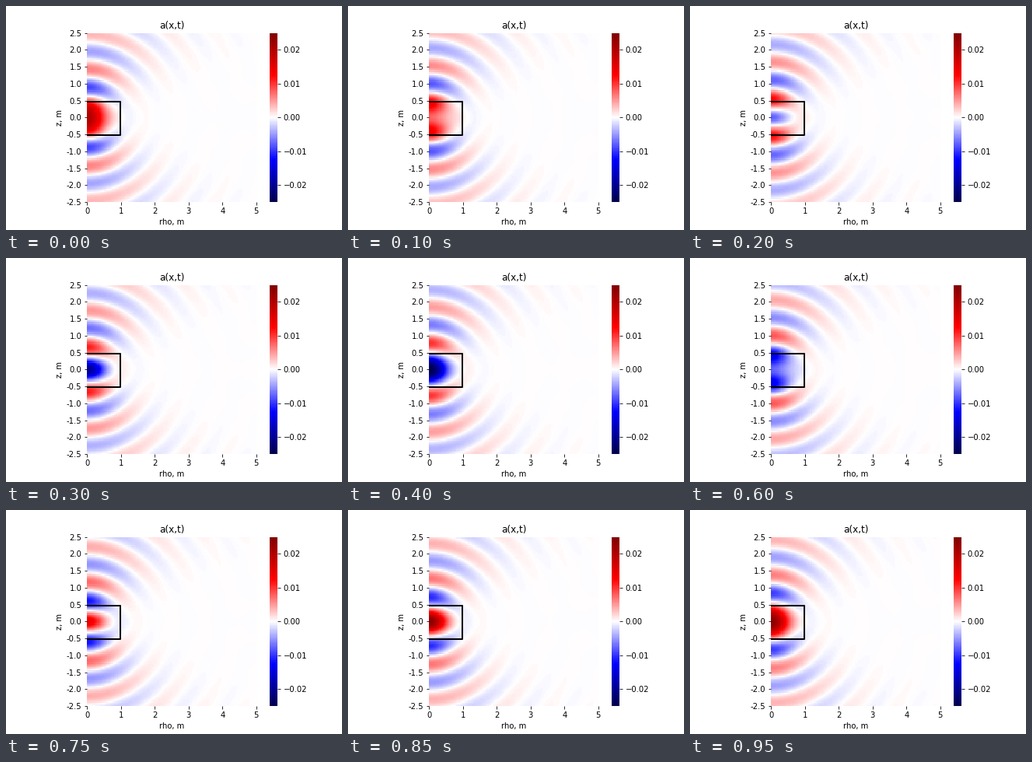
Animation of 432x288 px, one loop 1 s. Source, as a matplotlib script:

```python
import numpy as np
import matplotlib.pyplot as plt
from matplotlib.animation import FuncAnimation

FRAMES, LOOP_MS = 20, 1000
K = 2 * np.pi          # wavenumber, one metre per wave
PEAK = 0.025           # field amplitude at the centre
CELLS = 100


def midpoints(start, stop, count):
    edges = np.linspace(start, stop, count + 1)
    return (edges[:-1] + edges[1:]) / 2


SINES = np.sin(midpoints(0, np.pi, 160))


def bessel0(x):
    return np.cos(x[..., None] * SINES).mean(-1)


def bessel1(x):
    return (np.sin(x[..., None] * SINES) * SINES).mean(-1)


def radial_source(rho):
    return (bessel0(2.405 * rho) * bessel0(3.832 * rho)
            + 1.293 * bessel1(2.405 * rho) * bessel1(3.832 * rho))


def axial_response(kz, z):
    """Outgoing solution of w'' + kz^2 w = -cos(pi z) on |z| < 1/2."""
    z = np.abs(z)[:, None]
    near = np.minimum(z, 0.5)
    waves = np.exp(1j * kz * (0.5 + near)) + np.exp(1j * kz * (0.5 - near))
    inside = np.cos(np.pi * near) + 0.5j * np.pi / kz * waves
    outside = 1j * np.pi / kz * np.cos(kz / 2) * np.exp(1j * kz * z)
    return np.where(z < 0.5, inside, outside) / (np.pi**2 - kz**2)


def radiated_field(rho, z):
    """Complex field of the cylinder, summed over its Hankel spectrum."""
    # An even count keeps kz off the removable pole at pi.
    travelling = midpoints(0, K, 160)
    fading = midpoints(0, 25, 240)
    kz = np.concatenate([travelling, 1j * fading])
    weight = np.concatenate([travelling * K / 160, fading * 25 / 240])
    kt = np.sqrt((K**2 - kz**2).real)
    r = midpoints(0, 1, 80)
    spectrum = bessel0(np.outer(kt, r)) @ (r * radial_source(r)) / len(r)
    modes = (weight * spectrum)[:, None] * bessel0(np.outer(kt, rho))
    return axial_response(kz, z) @ modes


rho_edges = np.linspace(0, 5, CELLS + 1)
z_edges = np.linspace(-2.5, 2.5, CELLS + 1)
field = radiated_field(midpoints(0, 5, CELLS), midpoints(-2.5, 2.5, CELLS))
field *= -PEAK / np.abs(field).max()


def snapshot(i):
    return (field * np.exp(-2j * np.pi * i / FRAMES)).real


fig, ax = plt.subplots(figsize=(6, 4), dpi=72)
fig.subplots_adjust(bottom=0.125)
mesh = ax.pcolormesh(rho_edges, z_edges, snapshot(0), cmap="seismic",
                     vmin=-PEAK, vmax=PEAK)
z_ticks = np.linspace(-2.5, 2.5, 11)
ax.set_aspect("equal")
ax.set(xlim=(0, 5), ylim=(-2.5, 2.5), xticks=range(6),
       xlabel="rho, m", ylabel="z, m", title="a(x,t)")
ax.set_yticks(z_ticks, [f"{z:.1f}" for z in z_ticks])
ax.spines[:].set_visible(False)
ax.plot([0, 0.98, 0.98, 0], [0.475, 0.475, -0.525, -0.525], "k", lw=2)
bar = fig.colorbar(mesh, ax=ax, ticks=np.linspace(-0.02, 0.02, 5))
bar.outline.set_visible(False)


def update(i):
    mesh.set_array(snapshot(i))
    return [mesh]


anim = FuncAnimation(fig, update, frames=FRAMES, interval=LOOP_MS / FRAMES,
                     repeat=True, repeat_delay=0)
plt.show()
```
